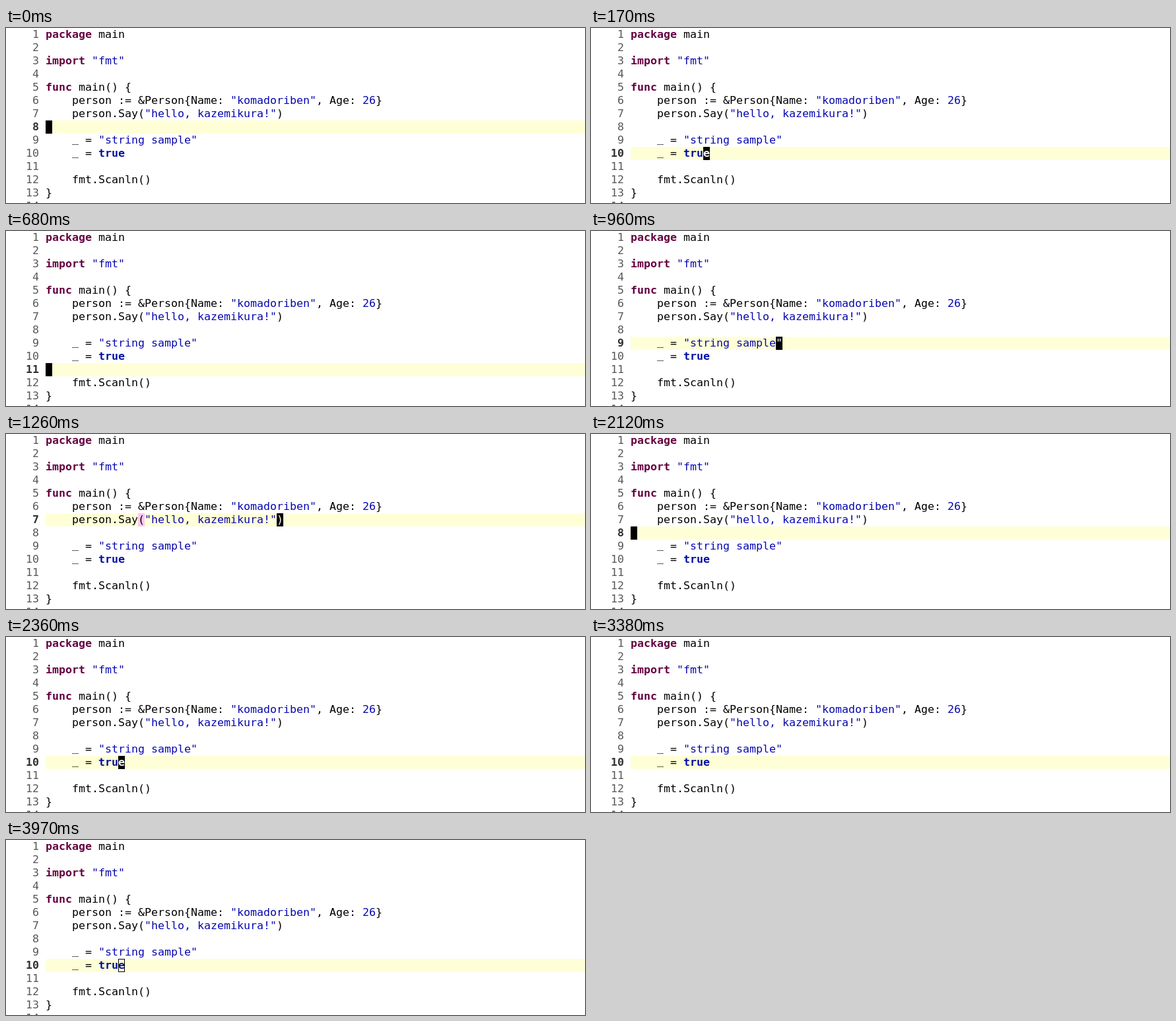
Write an HTML page with a canvas that moves like this. It is 877 by 265 pixels and loops after 4130 ms.

```html
<!DOCTYPE html>
<html lang="en">
<head>
<meta charset="utf-8">
<title>Editor cursor</title>
<style>
html, body { margin: 0; width: 877px; height: 265px; overflow: hidden; background: #fff; }
canvas { display: block; }
</style>
</head>
<body>
<canvas id="screen" width="877" height="265"></canvas>
<script>
const ctx = document.getElementById('screen').getContext('2d');
const LOOP = 4130, CELL = 10, ROW = 20, LEFT = 60, WIDTH = 877;
const FONT = '16.6px "DejaVu Sans Mono", monospace';

const lines = [
  'package main',
  '',
  'import "fmt"',
  '',
  'func main() {',
  '    person := &Person{Name: "komadoriben", Age: 26}',
  '    person.Say("hello, kazemikura!")',
  '',
  '    _ = "string sample"',
  '    _ = true',
  '',
  '    fmt.Scanln()',
  '}',
  ''
];

// Cursor moves: [start time, line number]
const moves = [
  [0, 8], [20, 9], [170, 10], [270, 11], [430, 12], [670, 11], [820, 10],
  [960, 9], [1110, 8], [1260, 7], [1360, 6], [1500, 5], [1800, 6],
  [1970, 7], [2100, 8], [2230, 9], [2360, 10]
];

// Partner of the bracket at the end of a line: [line number, column]
const partners = { 5: [13, 0], 6: [6, 21], 7: [7, 14], 12: [12, 14] };

const tokens = /("[^"]*")|(\bpackage\b|\bimport\b|\bfunc\b)|(\btrue\b)|(\b\d+\b)|./g;

function styleOf([, string, keyword, constant, number]) {
  if (keyword) return ['#650040', true];
  if (constant) return ['#0010a5', true];
  if (string || number) return ['#0808b0', false];
  return ['#000', false];
}

function box(line, col, color, width = CELL) {
  ctx.fillStyle = color;
  ctx.fillRect(LEFT + col * CELL, (line - 1) * ROW, width, ROW);
}

function write(text, line, col, color, bold) {
  ctx.font = (bold ? 'bold ' : '') + FONT;
  ctx.fillStyle = color;
  [...text].forEach((ch, i) => {
    const lift = ch === '_' ? 2 : 0;
    ctx.fillText(ch, LEFT + (col + i) * CELL, line * ROW - 5 - lift);
  });
}

function cursorShape(t) {
  if (t >= 3970) return 'hollow';
  return t >= 3380 && t < 3620 ? 'off' : 'block';
}

function draw(now) {
  const t = now % LOOP;
  const current = moves.filter(([start]) => start <= t).pop()[1];
  const cursorCol = Math.max(0, lines[current - 1].length - 1);
  const shape = cursorShape(t);
  const partner = partners[current];

  ctx.fillStyle = '#fff';
  ctx.fillRect(0, 0, WIDTH, 265);
  box(current, 0, '#ffffd7', WIDTH - LEFT);
  if (partner) box(...partner, '#ffc5f0');
  if (shape === 'block') box(current, cursorCol, '#000');

  lines.forEach((text, i) => {
    const line = i + 1, active = line === current;
    const label = String(line);
    write(label, line, -1 - label.length, active ? '#303030' : '#585858', active);

    for (const match of text.matchAll(tokens)) {
      const [color, bold] = styleOf(match);
      [...match[0]].forEach((ch, k) => {
        const col = match.index + k;
        const inverse = active && col === cursorCol && shape === 'block';
        write(ch, line, col, inverse ? '#fff' : color, bold);
      });
    }
  });

  if (shape === 'hollow') {
    ctx.strokeStyle = '#000';
    ctx.lineWidth = 1;
    ctx.strokeRect(LEFT + cursorCol * CELL + 0.5, (current - 1) * ROW + 0.5, CELL - 1, ROW - 1);
  }
}

const begin = performance.now();
function tick() {
  draw(performance.now() - begin);
  requestAnimationFrame(tick);
}
tick();
</script>
</body>
</html>
```
